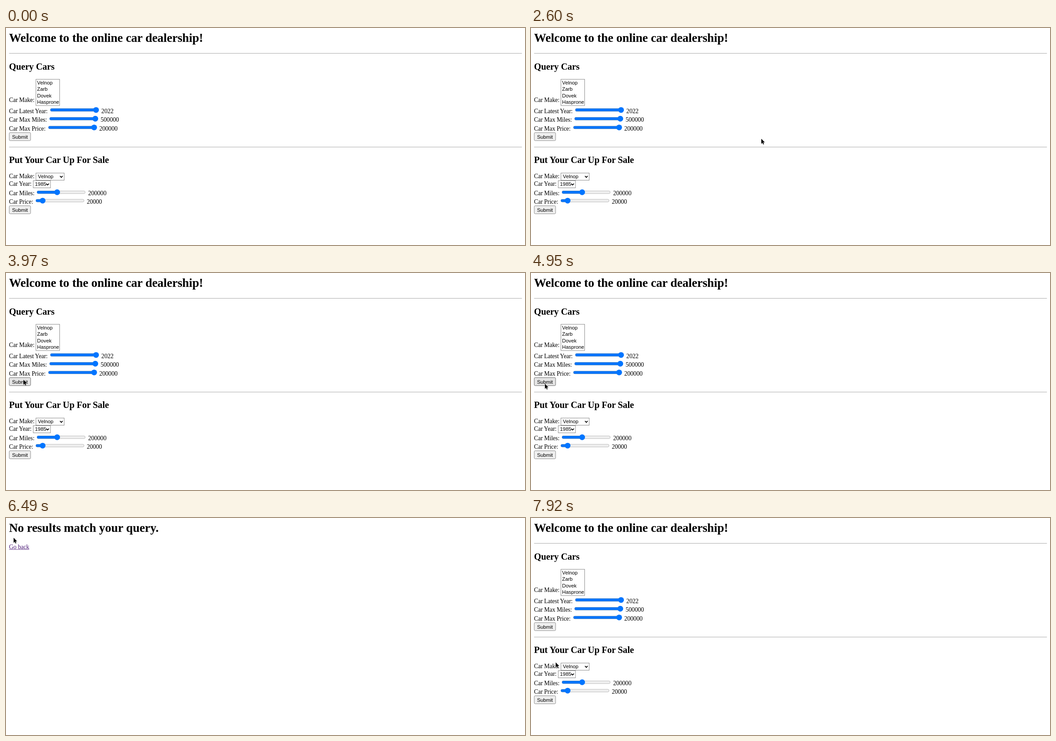
Animation of 1156 by 484 pixels, one loop 8 s. Source, as an HTML page:

```html
<!DOCTYPE html>
<html lang="en">
<head>
<meta charset="utf-8">
<title>Car dealership</title>
<style>
  html, body { margin: 0; width: 100%; height: 100%; overflow: hidden; background: #fff; }
  .page {
    position: absolute; left: 0; top: 0; width: 1360px;
    transform: scale(.85) translateY(-14px); transform-origin: 0 0; pointer-events: none;
    font: 16px "Liberation Serif", "Times New Roman", serif; letter-spacing: -.15px; color: #000;
  }
  .page > * { position: absolute; left: 8px; margin: 0; white-space: nowrap; }
  h1 { top: 21.4px; font-size: 32px; }
  h2 { font-size: 24px; }
  hr { width: 1344px; height: 1.18px; border: 0; background: #9a9a9a; }
  a { color: #50207a; text-decoration: underline; }
  output, .box { letter-spacing: 0; }
  .box, button { font: 13.333px "Liberation Sans", Arial, sans-serif; box-sizing: border-box; color: #000; border: 1px solid #767676; }
  .list { display: inline-block; vertical-align: -5px; width: 63px; height: 70px; padding: 0 2px; line-height: 17px; }
  .menu { display: inline-block; position: relative; height: 20px; padding-left: 4px; line-height: 18px; }
  .menu::after {
    content: ""; position: absolute; right: 4px; top: 5px; width: 4px; height: 4px;
    border: solid #000; border-width: 0 2px 2px 0; transform: rotate(45deg);
  }
  button { width: 57px; height: 22px; padding: 0; border-radius: 3px; background: #efefef; }
  button.hover { background: #e5e5e5; border-color: #4f4f4f; }
  input { width: 129px; height: 16px; margin: 2px; }
  svg { position: absolute; left: -.5px; top: 0; overflow: visible; pointer-events: none; filter: drop-shadow(.5px 1px .6px #0004); }
  path { stroke-linejoin: round; }
</style>
</head>
<body>
<div class="page" id="form">
  <h1>Welcome to the online car dealership!</h1>
  <hr style="top:79.9px">
  <h2 style="top:101.8px">Query Cars</h2>
  <div style="top:148.3px">Car Make: <div class="box list">Velnop<br>Zarb<br>Dovek<br>Hasprone</div></div>
  <div style="top:218.7px">Car Latest Year: <input type="range" value="100"> <output>2022</output></div>
  <div style="top:241.6px">Car Max Miles: <input type="range" value="100"> <output>500000</output></div>
  <div style="top:264.5px">Car Max Price: <input type="range" value="100"> <output>200000</output></div>
  <button id="query" style="top:288px">Submit</button>
  <hr style="top:325.8px">
  <h2 style="top:347.3px">Put Your Car Up For Sale</h2>
  <div style="top:394px">Car Make: <div class="box menu" style="width:75px">Velnop</div></div>
  <div style="top:414.2px">Car Year: <div class="box menu" style="width:46px">1985</div></div>
  <div style="top:434.5px">Car Miles: <input type="range" value="40"> <output>200000</output></div>
  <div style="top:457.4px">Car Price: <input type="range" value="10"> <output>20000</output></div>
  <button style="top:480.1px">Submit</button>
</div>
<div class="page" id="result">
  <h1>No results match your query.</h1>
  <a style="top:80.6px">Go back</a>
</div>
<svg id="cursor" width="20" height="20">
  <path id="arrow" d="M0 0V11L2.6 8.7 4.2 12.5 5.9 11.8 4.3 8.1H7.6Z" stroke="#fff" stroke-width="1" paint-order="stroke"/>
  <path id="hand" d="M-1 1Q0-1 1 1V6Q2 4.6 3.2 6 4.6 5 5.6 6.6 7.6 6 8 8V11L6.6 15H0L-4 9.4Q-4.4 7.4-2.6 8L-1 9.4Z" fill="#fff" stroke="#000" stroke-width=".9"/>
</svg>
<script>
const LOOP = 8000, STEP = 80, MOVE = 320;
const byId = id => document.getElementById(id);
const show = (id, on) => byId(id).style.display = on ? "" : "none";

// Pointer stops: [arrival time, x, y, travel time if not MOVE]
const stops = [
  [1070, 569, 141, 0], [1310, 525, 190], [1720, 172, 180], [2000, 110, 328], [2280, 330, 250],
  [2600, 513, 247], [2840, 68, 450], [3160, 200, 67], [3480, 181, 113], [3970, 39, 238],
  [4210, 31, 247], [5360, 384, 234, 0], [6080, 2, 27], [6490, 17, 44], [6870, 25, 66],
  [7920, 55, 322, 500]
];

// The pointer rests at a stop, then travels to the next in discrete steps.
function pointerAt(t) {
  const i = stops.findLastIndex(stop => stop[0] <= t);
  if (i < 0) return null;
  const [t0, x0, y0] = stops[i];
  const [t1, x1, y1, travel = MOVE] = stops[i + 1] || [LOOP, x0, y0];
  const span = Math.min(travel, t1 - t0);
  if (t < t1 - span) return [x0, y0];
  const n = Math.round(span / STEP);
  const f = Math.floor((1 - (t1 - t) / span) * n + .05) / n;
  return [x0 + (x1 - x0) * f, y0 + (y1 - y0) * f];
}

function draw(now) {
  const t = now % LOOP;
  const onResult = t >= 5360 && t < 7410;
  const onLink = onResult && t >= 6700;
  const pos = pointerAt(t);
  show("form", !onResult);
  show("result", onResult);
  show("arrow", !onLink);
  show("hand", onLink);
  show("cursor", pos);
  if (pos) byId("cursor").style.transform = `translate(${pos[0]}px, ${pos[1]}px)`;
  byId("query").classList.toggle("hover", t >= 3890 && t < 5360);
  requestAnimationFrame(draw);
}
requestAnimationFrame(draw);
</script>
</body>
</html>
```
